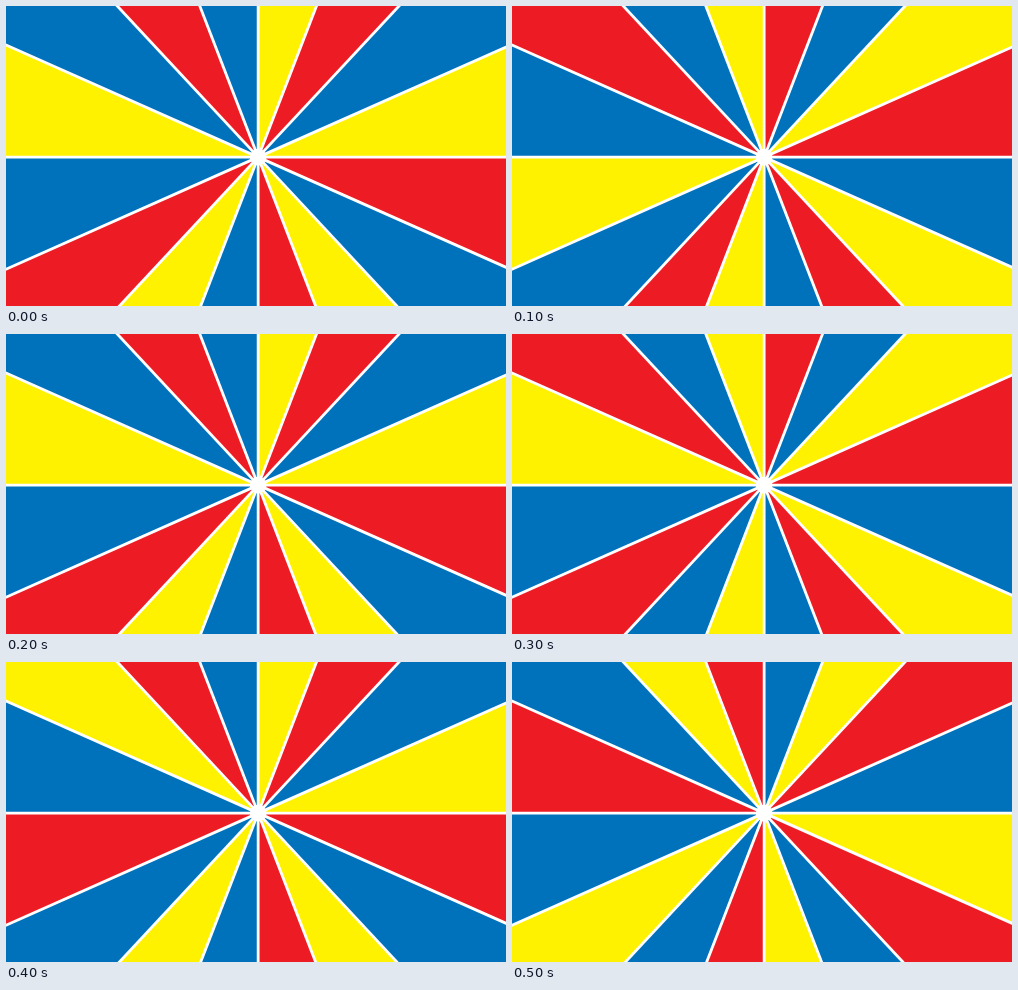
Recreate the animation shown at these times as an HTML page. Size 500 px wide and 300 px high, loop 600 ms.

```html
<!DOCTYPE html>
<html lang="en">
<head>
<meta charset="utf-8">
<title>Colour rays</title>
<style>
  html, body { margin: 0; width: 100%; height: 100%; overflow: hidden; background: #fff; }
  svg { display: block; }
  #strip { animation: step .6s steps(6) infinite; }
  #lines { stroke: #fff; stroke-width: 2.8; }
  #hub { fill: #fff; }
  .R { fill: #ed1c24; }
  .Y { fill: #fff200; }
  .B { fill: #0072bc; }
  @keyframes step { to { transform: translateX(-3000px); } }
</style>
</head>
<body>
<svg id="stage" width="500" height="300" viewBox="0 0 500 300">
  <g id="strip"></g>
  <g id="lines"></g>
  <circle id="hub" cx="252.15" cy="151.15" r="8.3"/>
</svg>
<script>
  const W = 500, H = 300, CX = 252.15, CY = 151.15;
  const COUNT = 16, REACH = 400, SQUASH = 0.932;

  // One ring of wedge colours, turned so that it begins at a given wedge
  const ring = 'B' + 'RBY'.repeat(5);
  const starts = [13, 12, 13, 9, 10, 11];

  // Ray tips, clockwise from the top: an even fan, narrowed sideways
  const tip = i => {
    const a = i * 2 * Math.PI / COUNT;
    return [CX + REACH * SQUASH * Math.sin(a), CY - REACH * Math.cos(a)];
  };
  const rays = Array.from({ length: COUNT }, (_, i) => i);

  const wedge = (i, start) => {
    const color = ring[(i - start + COUNT) % COUNT];
    return `<path class="${color}" d="M${CX} ${CY}L${tip(i)}L${tip(i + 1)}Z"/>`;
  };

  const panel = (start, n) =>
    `<svg x="${n * W}" width="${W}" height="${H}">${rays.map(i => wedge(i, start)).join('')}</svg>`;

  const line = i => {
    const [x, y] = tip(i);
    return `<line x1="${CX}" y1="${CY}" x2="${x}" y2="${y}"/>`;
  };

  document.getElementById('strip').innerHTML = starts.map(panel).join('');
  document.getElementById('lines').innerHTML = rays.map(line).join('');
</script>
</body>
</html>
```
